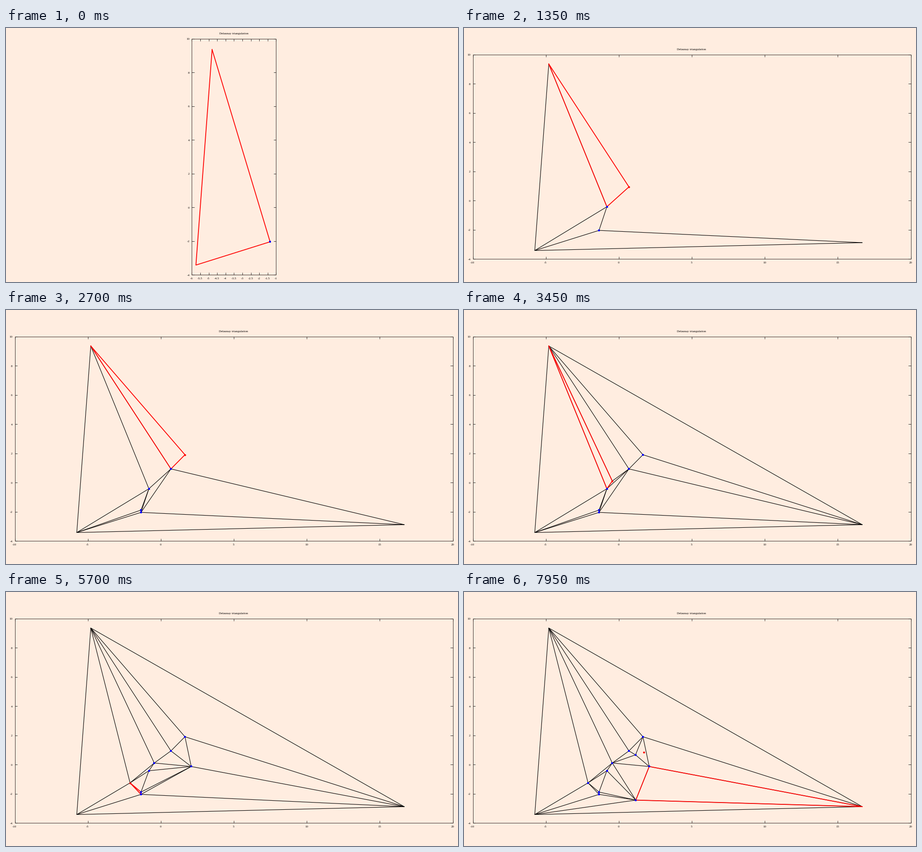
Recreate the animation shown at these times as a matplotlib script. Size 998 by 561 pixels, loop 8 s.

```python
import math

import matplotlib.pyplot as plt
import numpy as np
from matplotlib.animation import FuncAnimation
from matplotlib.collections import LineCollection

W, H, DPI = 998, 561, 64
PX = 72 / DPI  # points per pixel
BACKGROUND = "#ffede0"
plt.rcParams["font.family"] = "Liberation Serif"

# The first three points are the enclosing triangle.
POINTS = np.array([
    (-5.76, -3.42), (-4.80, 9.36), (16.67, -2.88),
    (-1.36, -2.04), (-0.82, -0.42), (0.69, 0.94), (-1.36, -1.88),
    (1.65, 1.91), (-0.45, 0.11), (2.08, -0.13), (-2.11, -1.25),
    (1.14, 0.67), (1.16, -2.43), (1.70, 0.84),
])

# Box in pixels (left, right, top, bottom), x range and x tick step.
NARROW = ((410.4, 596.5, 23.8, 545.2), (-6, -1), 0.5)
WIDE = ((19.6, 986.6, 58.9, 510.2), (-10, 20), 5)
Y_RANGE, Y_STEP = (-4, 10), 2


def in_circumcircle(triangle, p):
    a, b, c = POINTS[list(triangle)]
    rows = [(*(v - p), (v - p) @ (v - p)) for v in (a, b, c)]
    turn = np.linalg.det([b - a, c - a])
    return np.linalg.det(rows) * turn > 0


def insertion_steps():
    """Yield (triangles, highlighted triangle, number of the new point)."""
    triangles = [(0, 1, 2)]
    for new in range(3, len(POINTS)):
        p = POINTS[new]
        if new > 3:
            yield list(triangles), triangles[-1], new
        if new == len(POINTS) - 1:
            return
        bad = [t for t in triangles if in_circumcircle(t, p)]
        triangles = [t for t in triangles if t not in bad]

        def angle(i):
            dx, dy = POINTS[i] - p
            return math.atan2(dy, dx) % (2 * math.pi)

        ring = sorted({i for t in bad for i in t}, key=angle)
        for a, b in zip(ring, ring[1:] + ring[:1]):
            triangles.append((a, b, new))
            yield list(triangles), triangles[-1], new


STEPS = list(insertion_steps())

fig = plt.figure(figsize=(W / DPI, H / DPI), dpi=DPI, facecolor=BACKGROUND)
ax = fig.add_axes([0, 0, 1, 1])


def label(x, y, text, align="center"):
    ax.text(x - 0.7, y, text, ha=align, va="baseline", size=7 * PX)


def draw_axes(box, x_range, x_step):
    left, right, top, bottom = box
    tick = 5.5
    lines = [[(left, top), (right, top)], [(left, bottom), (right, bottom)],
             [(left, top), (left, bottom)], [(right, top), (right, bottom)]]
    for v in np.arange(x_range[0], x_range[1] + x_step / 2, x_step):
        x = np.interp(v, x_range, (left, right))
        lines += [[(x, bottom), (x, bottom - tick)], [(x, top), (x, top + tick)]]
        label(x, bottom + 10, f"{v:g}")
    for v in range(Y_RANGE[0], Y_RANGE[1] + 1, Y_STEP):
        y = np.interp(v, Y_RANGE, (bottom, top))
        lines += [[(left, y), (left + tick, y)], [(right, y), (right - tick, y)]]
        label(left - 4.3, y + 2.4, f"{v}", "right")
    label((left + right) / 2, top - 9.8, "Delaunay triangulation")
    ax.add_collection(LineCollection(
        lines, colors="black", linewidths=0.8 * PX, snap=True))


def to_pixels(box, x_range):
    left, right, top, bottom = box
    x = left + (POINTS[:, 0] - x_range[0]) / np.ptp(x_range) * (right - left)
    y = bottom - (POINTS[:, 1] - Y_RANGE[0]) / np.ptp(Y_RANGE) * (bottom - top)
    return np.column_stack([x, y])


def draw_dots(points, color, marker):
    ax.plot(*points.T, marker, color=color, ms=4.2 * PX, mew=0, zorder=5)


def update(frame):
    triangles, current, new = STEPS[frame // 3]
    view = NARROW if frame // 3 == 0 else WIDE
    ax.clear()
    ax.axis("off")
    draw_axes(*view)

    # Shared edges are drawn once so that smoothed lines do not darken.
    pix = to_pixels(*view[:2])
    edges = {tuple(sorted(e)) for a, b, c in triangles if (a, b, c) != current
             for e in ((a, b), (b, c), (c, a))}
    ax.add_collection(LineCollection(
        [pix[list(e)] for e in sorted(edges)], colors="black",
        linewidths=1.15 * PX, capstyle="round", zorder=3))
    a, b, c = current
    ax.plot(*pix[[a, b, c, a]].T, color="red", lw=1.8 * PX,
            solid_joinstyle="round", zorder=4)
    if new > 3:
        draw_dots(pix[new:new + 1], "red", "o")
    draw_dots(pix[3:max(new, 4)], "blue", "s")
    ax.set(xlim=(0, W), ylim=(H, 0))


animation = FuncAnimation(fig, update, frames=160, interval=50,
                          repeat=True, repeat_delay=0)
plt.show()
```
